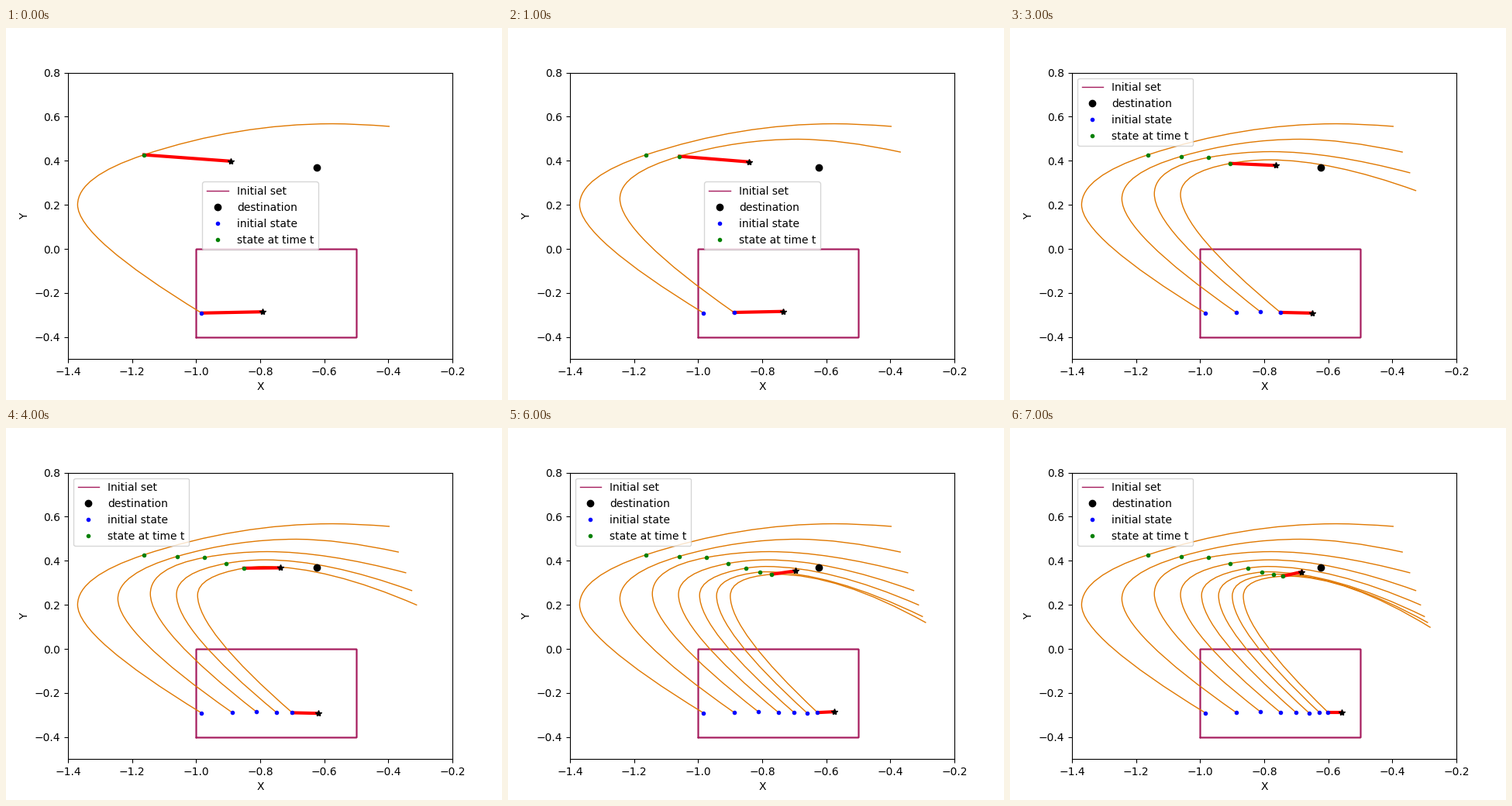
Animation of 640 by 480 pixels, one loop 8000 ms. Source, as a matplotlib script:

```python
import matplotlib.pyplot as plt
import numpy as np
from matplotlib.animation import FuncAnimation
from matplotlib.lines import Line2D
from matplotlib.patches import PathPatch
from matplotlib.path import Path

ORANGE = "#e07800"
PLUM = "#a51a5c"
COUNT = 8
SHRINK = 0.806  # share of the distance left after each step
DEST = np.array([-0.623, 0.3695])


def progress(i):
    return 1 - SHRINK ** np.asarray(i)


def ease(i, *values):
    """Value for trajectory i, led through four key trajectories."""
    return np.interp(progress(i), progress([0, 2, 5, 7]), values)


def start_point(i):
    return np.array([-0.983 + 0.49 * progress(i),
                     ease(i, -0.291, -0.286, -0.291, -0.287)])


def state_point(i):
    return np.array([DEST[0] - 0.54 * (1 - progress(i)),
                     ease(i, 0.427, 0.415, 0.349, 0.330)])


def trajectory(i):
    """Four parabolic arcs that share their tangents at the joints."""
    start, state = start_point(i), state_point(i)
    left = -1.370 + 0.648 * progress(i), ease(i, 0.200, 0.250, 0.242, 0.2395)
    top = (ease(i, -0.575, -0.778, -0.793, -0.730),
           ease(i, 0.568, 0.4415, 0.350, 0.3305))
    end = -0.396 + 0.148 * progress(i), ease(i, 0.556, 0.345, 0.146, 0.097)
    slope = 2 * (top[1] - state[1]) / (top[0] - state[0])
    verts = [
        start,
        (left[0], start[1] + 0.7 * (left[1] - start[1])), left,
        (left[0], state[1] - slope * (state[0] - left[0])), state,
        ((state[0] + top[0]) / 2, top[1]), top,
        (top[0] + 0.42 * (end[0] - top[0]), top[1]), end]
    return Path(verts, [Path.MOVETO] + [Path.CURVE3] * 8)


fig, ax = plt.subplots(figsize=(6.4, 4.8), dpi=100)
ax.set(xlim=(-1.4, -0.2), ylim=(-0.5, 0.8), xlabel="X", ylabel="Y")

# Overlaid strokes thicken the soft edges of the box.
for _ in range(4):
    ax.plot([-1, -0.5, -0.5, -1, -1], [-0.4, -0.4, 0, 0, -0.4], color=PLUM, lw=1)
ax.plot(*DEST, "ko", zorder=5)

curves = [ax.add_patch(PathPatch(trajectory(i), fc="none", ec=ORANGE, lw=1, zorder=2))
          for i in range(COUNT)]
arrows = [ax.plot([], [], color="red", lw=3, zorder=3)[0] for _ in range(2)]
stars, = ax.plot([], [], "k*", zorder=4)
start_dots, = ax.plot([], [], "b.", zorder=4)
state_dots, = ax.plot([], [], "g.", zorder=4)


def make_legend(loc):
    handles = [
        Line2D([], [], color=PLUM, lw=1, label="Initial set"),
        Line2D([], [], color="k", marker="o", ls="", label="destination"),
        Line2D([], [], color="b", marker=".", ls="", label="initial state"),
        Line2D([], [], color="g", marker=".", ls="", label="state at time t")]
    legend = ax.legend(handles=handles, loc=loc)
    legend.set_zorder(6)
    return legend


centre_legend = make_legend("center")
ax.add_artist(centre_legend)
corner_legend = make_legend("upper left")


def draw(i):
    for k, curve in enumerate(curves):
        curve.set_visible(k <= i)
    shown = np.arange(i + 1)
    start_dots.set_data(*start_point(shown))
    state_dots.set_data(*state_point(shown))

    start, state = start_point(i), state_point(i)
    start_tip = 2 * start_point(i + 1) - start
    state_tip = (state + DEST) / 2
    arrows[0].set_data(*np.array([start, start_tip]).T)
    arrows[1].set_data(*np.array([state, state_tip]).T)
    stars.set_data(*np.array([start_tip, state_tip]).T)

    centre_legend.set_visible(i < 3)
    corner_legend.set_visible(i >= 3)
    return []


anim = FuncAnimation(fig, draw, frames=COUNT, interval=1000, repeat=True, repeat_delay=0)
plt.show()
```
